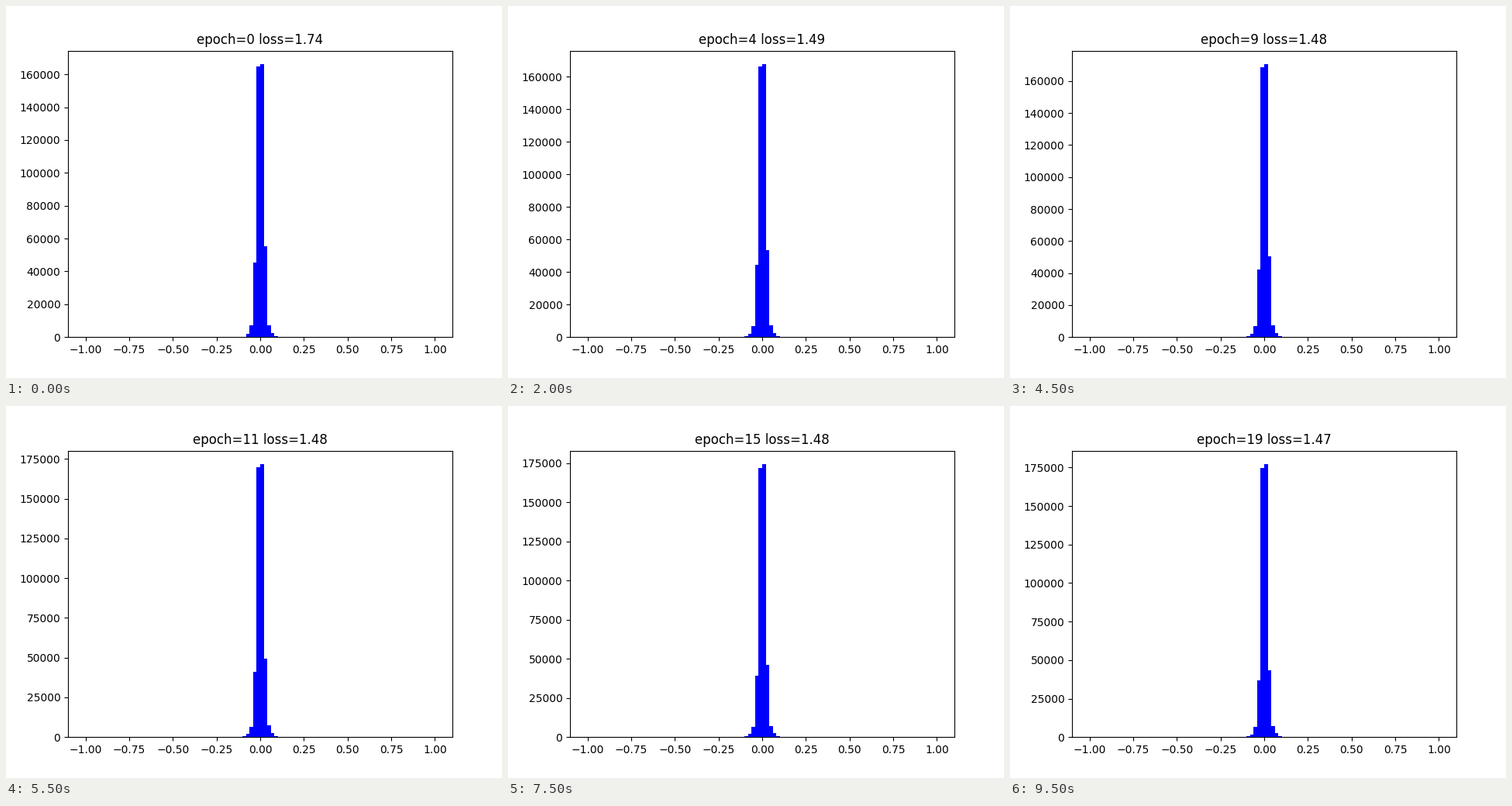
A matplotlib script for the animation above (10 s loop, 640 by 480 pixels).

```python
import matplotlib.pyplot as plt
import numpy as np
from matplotlib.animation import FuncAnimation

EPOCHS = 20
EDGES = np.linspace(-1, 1, 101)
CENTERS = (EDGES[:-1] + EDGES[1:]) / 2

# Counts of the ten bins from -0.1 to 0.1 before and after training.
START = np.array([329, 2085, 6950, 45450, 164900, 166150, 55350, 7380, 2450, 600])
END = np.array([470, 1755, 6410, 36800, 174600, 177140, 43300, 7070, 2450, 600])


def counts_at(epoch):
    progress = (epoch / (EPOCHS - 1)) ** 1.25
    counts = np.zeros(len(CENTERS))
    counts[np.abs(CENTERS) < 0.1] = START + (END - START) * progress
    return counts


def loss_at(epoch):
    return 1.4735 + 0.2665 * (epoch + 1) ** -1.745


def draw(epoch):
    ax.clear()
    ax.hist(CENTERS, bins=EDGES, weights=counts_at(epoch), color="blue")
    ax.set_title(f"epoch={epoch} loss={loss_at(epoch):.2f}")


fig, ax = plt.subplots(figsize=(6.4, 4.8), dpi=100)
anim = FuncAnimation(fig, draw, frames=EPOCHS, init_func=lambda: None,
                     interval=500, repeat=True, repeat_delay=0)
plt.show()
```
